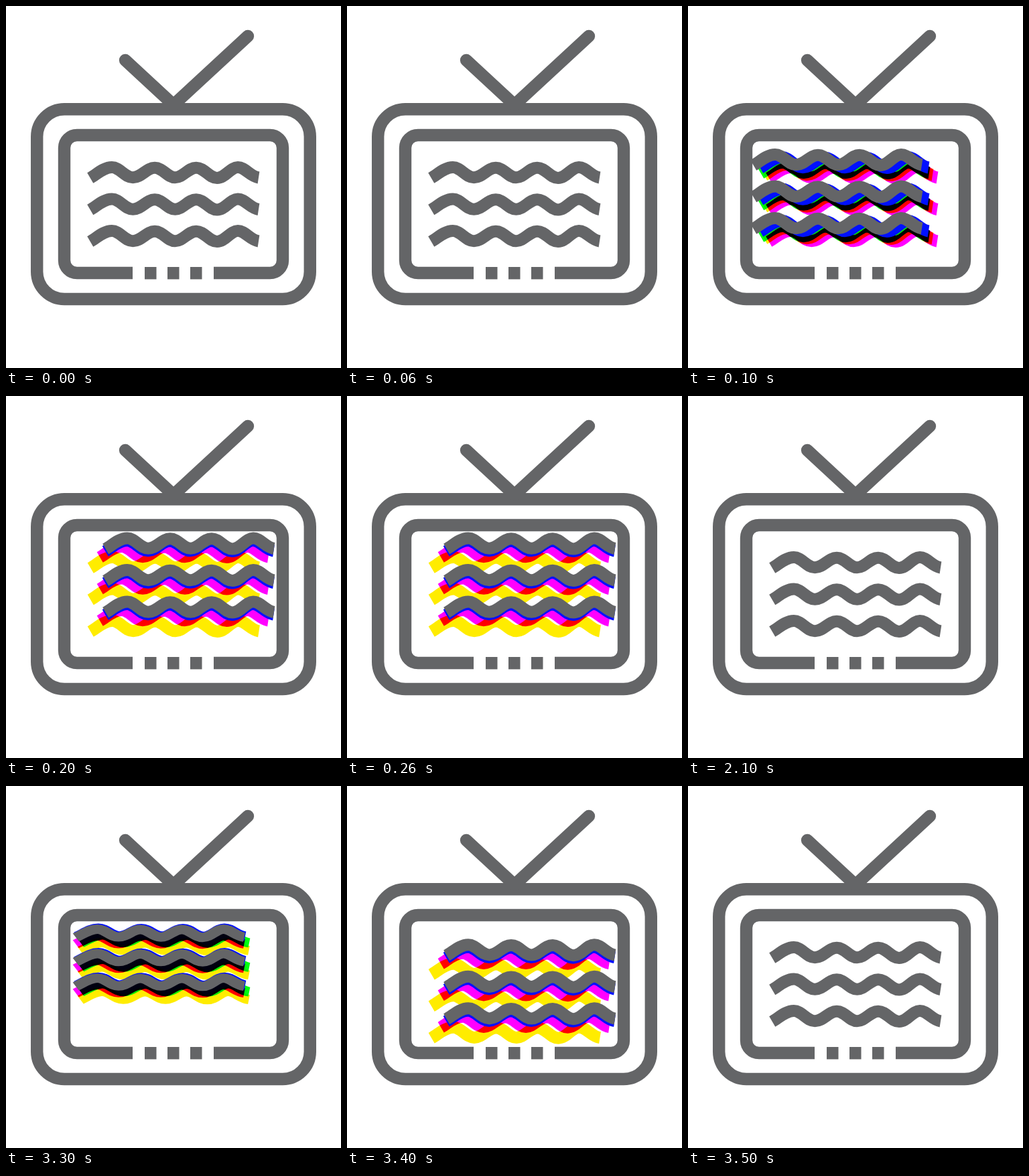
Animation, 500 px wide and 541 px high, one loop 3.6 s. Source, as an HTML page with a canvas:

```html
<!DOCTYPE html>
<html lang="en">
<head>
<meta charset="utf-8">
<title>Glitching television</title>
<style>
  html, body { margin: 0; height: 100%; overflow: hidden; background: #fff; }
  canvas { display: block; }
</style>
</head>
<body>
<canvas id="stage" width="500" height="541"></canvas>
<script>
const ctx = document.getElementById('stage').getContext('2d');
const LOOP = 3600;
const GRAY = '#646567';
const COLORS = { yellow: '#ffec00', magenta: '#ff00ff', green: '#00ff10', blue: '#0010ff', gray: GRAY };
const ROW_GAP = 47.5;

const wave = new Path2D(
  'M125.7 257C136 251 146 241 158 241S177 256.2 189.5 256.2S210 241.7 222 241.7' +
  'S241 256.3 252.5 256.3S272 241.7 284 241.7S303 257 315 257S335 241 346 241S364 254.5 377 256.5');
const waves = new Path2D();
for (let row = 0; row < 3; row++) waves.addPath(wave, new DOMMatrix().translate(0, row * ROW_GAP));

const frame = new Path2D('M189 399H106A19 19 0 0 1 87 380V212A19 19 0 0 1 106 193H394A19 19 0 0 1 413 212V380A19 19 0 0 1 394 399H310');
frame.roundRect(46.2, 154.2, 407.6, 283.8, 41);
const antenna = new Path2D('M178 81L250 147.7L361 45');

// Colour offsets [x, y], listed from back to front
const calm = { gray: [0, 0] };
const spread = { yellow: [-12, -4], magenta: [-5, 0], green: [-17, -7], blue: [-18, -15], gray: [-28, -19] };
const lifted = { yellow: [0.5, 0], magenta: [14.5, -16], blue: [22.5, -25], gray: [23, -28.5] };
const squashed = { yellow: [7, 20], magenta: [0, 10], green: [7.5, 8.5], blue: [1.5, -1.5], gray: [0, 0] };

// Each pose holds from its start time: [start, layers, x, y, vertical scale]
const poses = [
  [0, calm, 0, 0, 1],
  [100, spread, 0, 0, 1],
  [200, lifted, 0, 0, 1],
  [300, calm, 0, 0, 1],
  [3300, squashed, -21.5, 28.4, 0.77],
  [3400, lifted, 0, 24.7, 1],
  [3500, calm, 0, 0, 1],
];

function drawWaves([, layers, x, y, scale]) {
  ctx.lineWidth = 18;
  ctx.lineCap = 'butt';
  for (const [name, [dx, dy]] of Object.entries(layers)) {
    const opaque = name === 'gray' || name === 'blue';
    ctx.save();
    ctx.globalCompositeOperation = opaque ? 'source-over' : 'multiply';
    ctx.strokeStyle = COLORS[name];
    ctx.translate(x + dx, y + dy);
    ctx.scale(1, scale);
    ctx.stroke(waves);
    ctx.restore();
  }
}

function drawSet() {
  ctx.strokeStyle = ctx.fillStyle = GRAY;
  ctx.lineWidth = 18.4;
  ctx.stroke(frame);
  for (let i = 0; i < 3; i++) ctx.fillRect(207 + i * 34, 390, 17.5, 18.4);
  ctx.lineCap = ctx.lineJoin = 'round';
  ctx.stroke(antenna);
}

function draw(now) {
  const t = now % LOOP;
  ctx.fillStyle = '#fff';
  ctx.fillRect(0, 0, 500, 541);
  drawWaves(poses.findLast(([start]) => start <= t));
  drawSet();
}

const begin = performance.now();
function tick() {
  draw(performance.now() - begin);
  requestAnimationFrame(tick);
}
tick();
</script>
</body>
</html>
```
